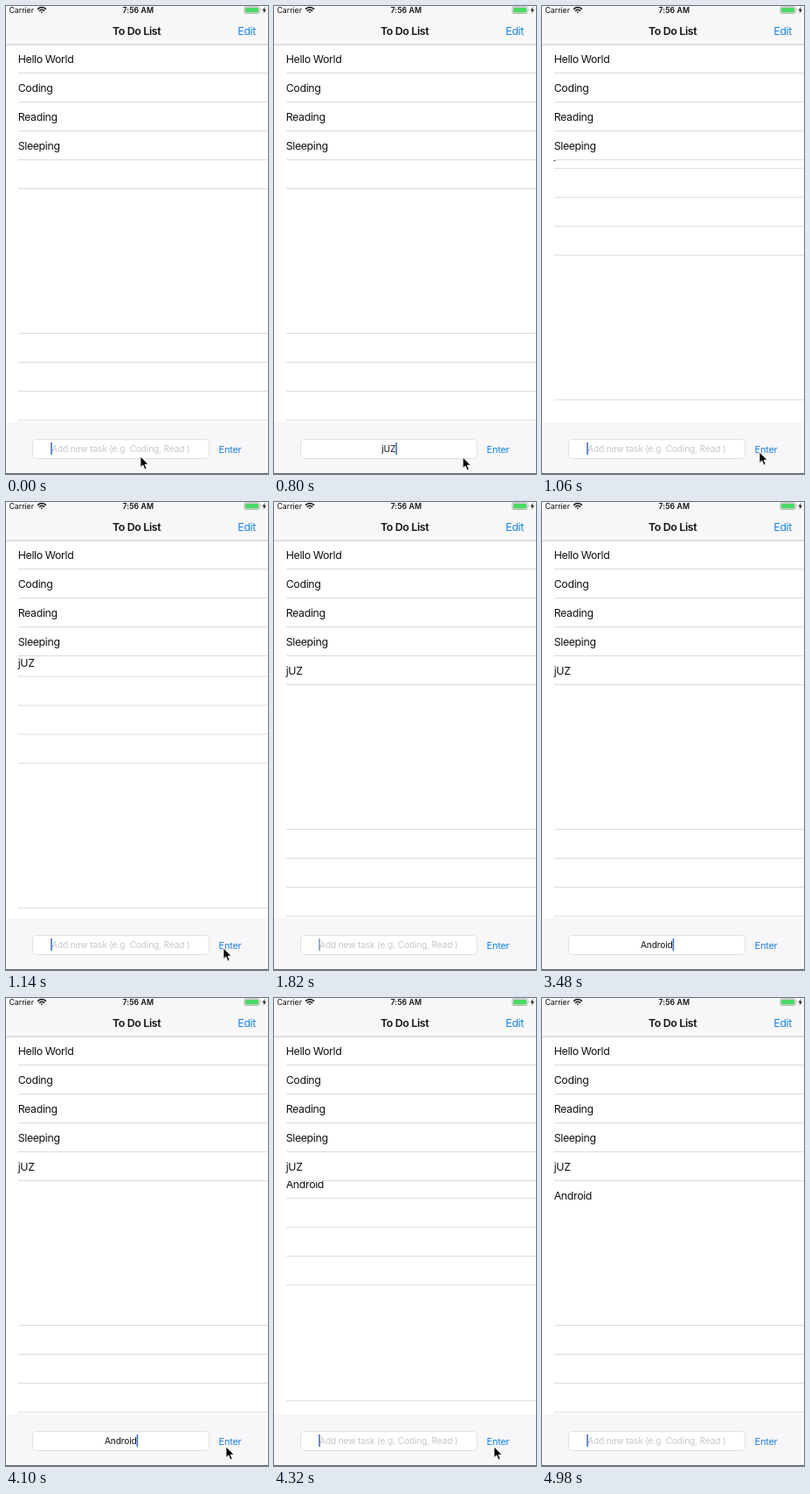
Recreate the animation shown at these times as an HTML page. Size 300x534 px, loop 5 s.

```html
<!DOCTYPE html>
<html lang="en">
<head>
<meta charset="utf-8">
<title>To Do List</title>
<style>
  html, body { margin: 0; height: 100%; overflow: hidden; background: #fff; }
  svg { display: block; width: 100vw; height: 100vh; }
  text { font: 12.36px Inter, "Open Sans", sans-serif; letter-spacing: -.35px; fill: #111; white-space: pre; }
  .title { font-weight: 600; }
  .link { fill: #1480f0; }
  .small { font-size: 8.7px; letter-spacing: 0; }
  .clock { font-weight: 600; letter-spacing: .1px; }
  .enter { font-size: 10.9px; letter-spacing: -.2px; }
  .input { font-size: 10.2px; letter-spacing: -.17px; text-anchor: middle; }
  .hint { fill: #c7c7cd; }
  .line { fill: #dcdbe0; }
</style>
</head>
<body>
<svg viewBox="0 0 300 534">
  <defs><clipPath id="clip"><rect id="clipBox" width="300" height="400"/></clipPath></defs>
  <rect width="300" height="534" fill="#fff"/>
  <g id="rows"></g>
  <g id="lines"></g>
  <g clip-path="url(#clip)"><g id="sliding"></g></g>

  <rect width="300" height="44" fill="#f8f7f9"/>
  <rect y="43.5" width="300" height="1" fill="#c4c3c7"/>
  <text class="small" x="3.5" y="8">Carrier</text>
  <g fill="none" stroke="#111" stroke-width="1.5">
    <path d="M36 3.6Q41 -.6 46 3.6M37.8 5.6Q41 2.8 44.2 5.6"/>
    <path d="M39.4 6.4H42.6L41 8.2Z" fill="#111" stroke="none"/>
  </g>
  <text class="small clock" x="133.5" y="8">7:56 AM</text>
  <rect x="273" y="1" width="17" height="7.4" rx="1.6" fill="none" stroke="#888" stroke-width=".7"/>
  <rect x="274" y="2" width="15" height="5.4" rx=".8" fill="#4cd964"/>
  <path d="M291 3.4Q292.2 4.7 291 6Z" fill="#888"/>
  <path d="M296.6 1L293.6 5.2H295.6L294.8 8.6L298 4.2H296Z" fill="#111"/>
  <text class="title" x="122" y="32.5">To Do List</text>
  <text class="link" x="265.3" y="32.5">Edit</text>

  <rect y="475" width="300" height="59" fill="#f7f6f8"/>
  <rect y="533" width="300" height="1" fill="#666"/>
  <rect x="30.5" y="494.5" width="202" height="22" rx="4" fill="#fff" stroke="#e0dfe2"/>
  <text id="input" class="input" x="131.3" y="508.8"></text>
  <rect id="caret" y="498" width="1.6" height="14" fill="#426fc8"/>
  <text class="link enter" x="243.6" y="509.5">Enter</text>
  <path id="cursor" d="M0 0V12.4L2.9 9.8L5 14.7L7.1 13.8L5 9.1H9Z" fill="#000" stroke="#fff" stroke-width=".8"/>
</svg>
<script>
const $ = id => document.getElementById(id);
const LOOP = 5000, SLIDE = 280, ROW = 33, TOP = 44;
const HINT = 'Add new task (e.g. Coding, Read )';
const tasks = ['Hello World', 'Coding', 'Reading', 'Sleeping', 'jUZ', 'Android'];
const inserts = [960, 4160];
const typing = [
  { word: tasks[4], keys: [180, 400, 560], end: inserts[0] },
  { word: tasks[5], keys: [2240, 2760, 2880, 3000, 3120, 3240, 3480], end: inserts[1] }
];
// Each key is [time, values...]
const caretKeys = [[0, 1], [1520, 1], [1640, 0], [1780, 0], [1840, 1], [4440, 1], [4560, 0], [4720, 0], [4780, 1]];
const cursorPaths = [
  { from: 0, to: 180, keys: [[0, 154, 514]] },
  { from: 740, to: 1250, keys: [[740, 172, 517], [800, 216, 515], [940, 249, 509]] },
  { from: 3760, to: 4540, keys: [[3760, 249, 509], [3900, 262, 518], [4060, 252, 512]] }
];

const rowLine = i => TOP + ROW * (i + 1) - 1;
const label = i => `<text x="13.7" y="${TOP + ROW * i + 21}">${tasks[i]}</text>`;
const line = i => `<rect class="line" x="14" y="${rowLine(i)}" width="286" height="1"/>`;
const fill = (id, html) => { if ($(id).innerHTML !== html) $(id).innerHTML = html; };

function sample(keys, t) {
  const i = keys.findIndex(k => k[0] > t);
  if (i < 0) return keys.at(-1).slice(1);
  const a = keys[i - 1], b = keys[i], p = (t - a[0]) / (b[0] - a[0]);
  return a.slice(1).map((v, n) => v + (b[n + 1] - v) * p);
}

function drawList(t) {
  const count = 4 + inserts.filter(s => t >= s + SLIDE).length;
  const start = inserts.find(s => t >= s && t < s + SLIDE);
  const moving = start !== undefined;
  fill('rows', tasks.slice(0, count).map((_, i) => label(i)).join(''));
  const fixed = moving ? [...Array(count).keys()] : [0, 1, 2, 3, 4, 9, 10, 11, 12];
  fill('lines', fixed.map(line).join(''));
  const shown = [0, 1, 2, 3].map(n => count + n).concat(12);
  fill('sliding', moving ? label(count) + shown.map(line).join('') : '');
  if (!moving) return;
  const p = (t - start) / SLIDE, ease = p * p * (3 - 2 * p);
  $('sliding').setAttribute('transform', `translate(0 ${ROW * (ease - 1)})`);
  $('clipBox').setAttribute('y', rowLine(count - 1) + 1);
}

function drawField(t) {
  const entry = typing.find(e => t >= e.keys[0] && t < e.end);
  const input = $('input');
  input.textContent = entry ? entry.word.slice(0, entry.keys.filter(k => t >= k).length) : HINT;
  input.classList.toggle('hint', !entry);
  const x = entry ? 131.3 + input.getComputedTextLength() / 2 : 51.2;
  $('caret').setAttribute('x', x);
  $('caret').setAttribute('opacity', sample(caretKeys, t)[0]);
}

function drawCursor(t) {
  const path = cursorPaths.find(c => t >= c.from && t < c.to);
  $('cursor').setAttribute('visibility', path ? 'visible' : 'hidden');
  if (path) $('cursor').setAttribute('transform', `translate(${sample(path.keys, t).join(' ')})`);
}

function frame() {
  const t = performance.now() % LOOP;
  drawList(t);
  drawField(t);
  drawCursor(t);
  requestAnimationFrame(frame);
}
frame();
</script>
</body>
</html>
```
